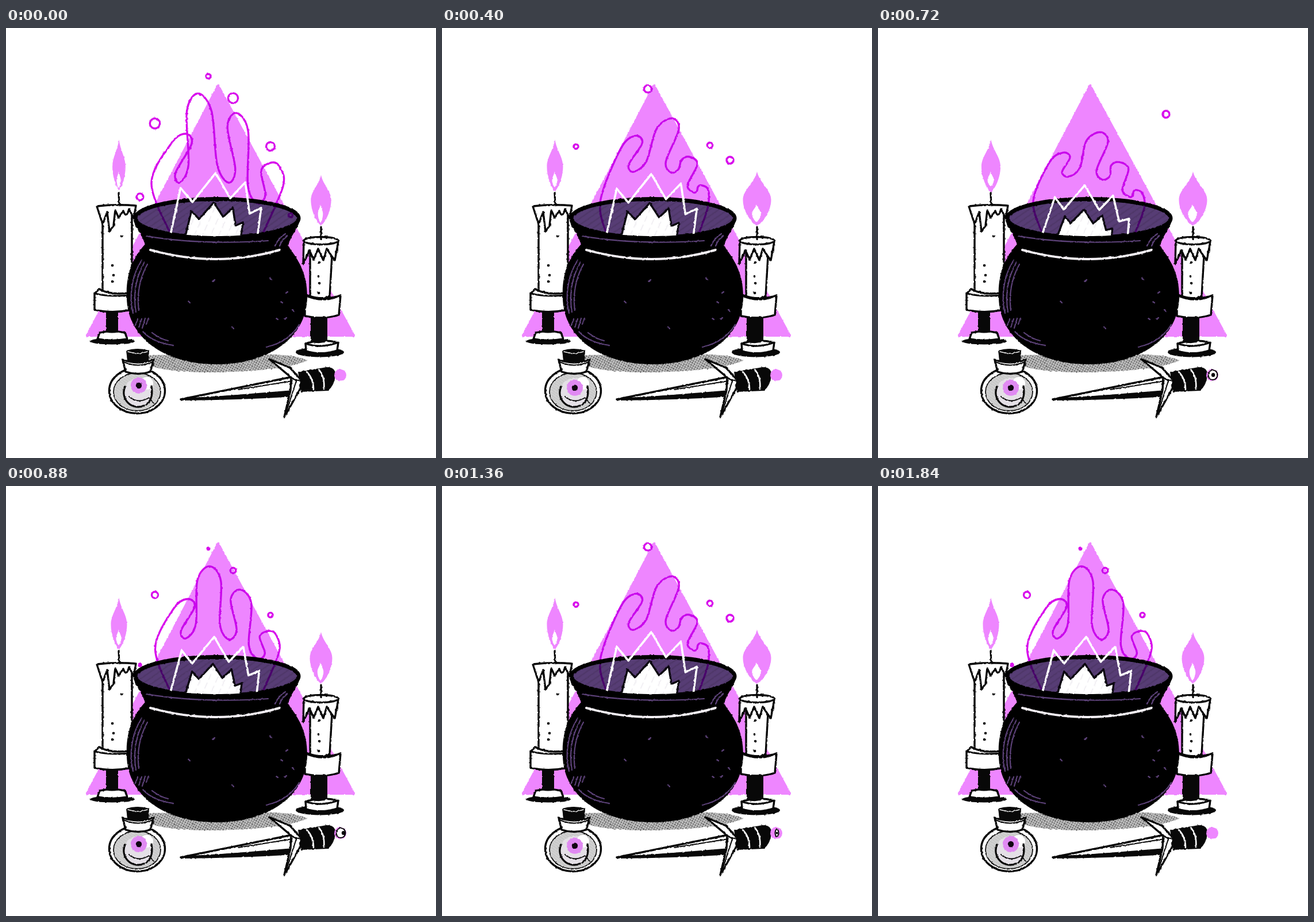
Recreate the animation shown at these times as an HTML page. Size 748 px wide and 748 px high, loop 1920 ms.

```html
<!DOCTYPE html>
<html lang="en">
<head>
<meta charset="utf-8">
<title>Cauldron</title>
<style>
html, body { margin: 0; width: 100%; height: 100%; overflow: hidden; background: #fff; }
svg { display: block; width: 100vw; height: 100vh; }
.ink { fill: #fff; stroke: #060606; stroke-width: 3.4; }
.line { fill: none; stroke: #060606; stroke-width: 3.2; }
.thin { stroke-width: 2; }
.black { fill: #080808; }
.dots { fill: none; stroke: #080808; stroke-width: 4.6; }
.shine { fill: none; stroke: #5d4279; stroke-width: 2.2; }
.magic { fill: none; stroke: #d80cec; stroke-width: 3.4; mix-blend-mode: multiply; }
.pink { fill: #ee86ff; }
</style>
</head>
<body>
<svg viewBox="0 0 748 748" stroke-linecap="round" stroke-linejoin="round">
<defs>
  <filter id="rough" filterUnits="userSpaceOnUse" x="0" y="0" width="748" height="748" color-interpolation-filters="sRGB">
    <feTurbulence type="fractalNoise" baseFrequency=".25" numOctaves="1" seed="4"/>
    <feDisplacementMap in="SourceGraphic" scale="3" xChannelSelector="R" yChannelSelector="G"/>
  </filter>
  <pattern id="stipple" width="4" height="4" patternUnits="userSpaceOnUse" patternTransform="rotate(28)">
    <rect width="4" height="4" fill="#c0c0c0"/><circle cx="2" cy="2" r="1.2" fill="#5c5c5c"/>
  </pattern>
  <pattern id="glass" width="4" height="4" patternUnits="userSpaceOnUse" patternTransform="rotate(35)">
    <rect width="4" height="4" fill="#d2d2d2"/><path d="M0 2H4" stroke="#bcbcbc" stroke-width="1.2"/>
  </pattern>
  <pattern id="hatch" width="9" height="9" patternUnits="userSpaceOnUse" patternTransform="rotate(-35)">
    <rect width="9" height="9" fill="#573d75"/><path d="M0 4H9" stroke="#4f3769" stroke-width="2.5"/>
  </pattern>
  <pattern id="scribble" width="13" height="17" patternUnits="userSpaceOnUse" patternTransform="rotate(24)">
    <rect width="13" height="17" fill="#fff"/><path d="M4 0V11" stroke="#e6e1ea"/>
  </pattern>
  <clipPath id="mouth"><path d="M0 0H748V331H509C509 349 445 362 367 362S225 349 225 331H0Z"/></clipPath>
</defs>
<g filter="url(#rough)">
  <path class="pink" stroke="#ee86ff" stroke-width="4" d="M369 100L141 535H605Z"/>
  <path fill="url(#stipple)" d="M222 569C238 592 290 600 370 599C450 597 500 590 525 578C505 569 470 567 440 568Z"/>

  <!-- left candle -->
  <ellipse class="black" cx="185" cy="545" rx="39" ry="5.5"/>
  <path class="ink" d="M159 541L163 530Q185 525 207 530L211 541Q185 546 159 541Z"/>
  <path class="black" d="M174 488H195V529Q185 532 174 529Z"/>
  <path class="ink" d="M168 312V458Q190 470 219 461V312Z"/>
  <path class="ink" d="M154 462L162 454Q180 465 214 461V491Q182 497 154 490Z"/>
  <path class="line" d="M155 462Q180 468 213 465"/>
  <path class="ink" d="M158 310Q192 306 226 309L222 331L214 315Q209 333 204 318L196 330L190 317L187 344L180 354L176 320L168 341Z"/>
  <path class="line" d="M196 287L197 309"/>
  <path class="dots" d="M201 362h.1M185 413h.1M187 430h.1M185 441h.1"/>

  <!-- right candle -->
  <ellipse class="black" cx="546" cy="564" rx="42" ry="8.5"/>
  <path class="ink" d="M521 549Q548 540 578 547L576 561Q548 570 522 562Z"/>
  <path class="line" d="M521 549Q548 558 578 547"/>
  <path class="black" d="M530 500H559V545Q546 551 530 546Z"/>
  <path class="ink" d="M529 380V467Q546 474 563 467L568 380Z"/>
  <path class="ink" d="M520 463Q548 476 582 465L579 499Q552 508 520 501Z"/>
  <path class="line" d="M521 465Q550 479 581 466"/>
  <path class="ink" d="M518 370L517 410L528 387L535 403L543 384L552 404L558 384L566 396L572 404L578 372Z"/>
  <ellipse class="ink" cx="548" cy="370" rx="30" ry="6.5"/>
  <path class="line" d="M548 346V368"/>
  <path class="dots" d="M545 408h.1M543 432h.1M545 444h.1M544 461h.1"/>

  <path id="leftFlame" class="pink"/><path id="leftCore" fill="#fff"/>
  <path id="rightFlame" class="pink"/><path id="rightCore" fill="#fff"/>

  <!-- cauldron -->
  <path d="M243 375C222 398 208 425 210 470C212 541 278 585 366 585S523 541 524 468C524 425 508 403 490 378Z"/>
  <path d="M221 330C224 349 238 358 243 381Q367 420 491 382C493 361 510 349 512 330Z"/>
  <ellipse cx="367" cy="331" rx="142" ry="33.5" fill="url(#hatch)" stroke="#000" stroke-width="7"/>
  <path id="fire" class="magic"/>
  <g id="bubbles" class="magic"></g>
  <g clip-path="url(#mouth)">
    <path id="crown" fill="url(#scribble)" stroke="#0b0710" stroke-width="3.4"/>
    <path id="zigzag" fill="none" stroke="#fff" stroke-width="3.6"/>
  </g>
  <path fill="none" stroke="#f3eff4" stroke-width="4" d="M251 386Q366 418 476 386"/>
  <path class="shine" d="M244 362Q340 378 456 370M468 379Q474 365 486 358M476 379Q480 368 489 362
    M236 404C216 435 215 472 221 496M241 407C223 439 222 470 226 494M246 411C230 440 228 467 231 491
    M229 507L225 517M236 506L231 521M242 505L237 522M248 505L244 515
    M238 528Q255 547 291 552M254 530Q268 541 282 544M453 555Q492 546 510 516
    M359 441l4-3M317 475l3 3M393 520l3 3M459 435l3 3M478 476l3 2M487 461l3-2M498 490l3 3M485 506l3-2M470 505l3 2"/>

  <!-- bottle -->
  <ellipse class="ink" cx="228" cy="631" rx="48.5" ry="39.5"/>
  <ellipse cx="228" cy="633" rx="41" ry="33" fill="url(#glass)" stroke="#111" stroke-width="1.8"/>
  <circle cx="230" cy="634" r="25" fill="#e4e0e6"/>
  <circle cx="245" cy="618" r="11" fill="#fff"/>
  <path class="line" d="M207 624A25 25 0 0 0 240 657M244 655Q257 646 253 623"/>
  <path class="line thin" d="M214 641Q229 655 249 643L257 653"/>
  <g id="iris"><circle r="14" fill="#e08af2"/><circle r="5.2" fill="#100612"/></g>
  <path class="ink" d="M203 577Q230 587 257 577L251 598Q230 605 208 598Z"/>
  <path class="line thin" d="M205 581Q230 592 255 581"/>
  <path class="black" d="M209 561Q229 555 249 561L248 579Q230 585 211 579Z"/>
  <path fill="none" stroke="#eee" stroke-width="1.4" d="M212 563Q230 569 246 563"/>

  <!-- dagger -->
  <path class="ink" d="M304 646L497 607L502 634Z"/>
  <path class="black" d="M304 646L500 630L505 641Q410 647 304 648Z"/>
  <path class="line thin" d="M404 629L498 614"/>
  <path class="black" d="M508 598L558 590Q573 590 573 603Q572 621 560 631L513 633Z"/>
  <path fill="none" stroke="#fff" stroke-width="2.6" d="M523 598Q535 610 535 629M544 594Q555 607 553 628"/>
  <path class="ink" d="M458 576L494 591L514 613L511 629L484 677L495 630L496 608Z"/>
  <path class="line thin" d="M460 578L505 614L486 673M497 610L512 614"/>
  <circle class="pink" cx="581.5" cy="604" r="10.5"/>
  <g id="pommelEye">
    <ellipse id="lid" cx="582.5" cy="603.5" class="ink thin"/>
    <ellipse id="pupil" cy="603.5" class="black"/>
  </g>
</g>
</svg>
<script>
const $ = id => document.getElementById(id);
const set = (el, attrs) => Object.entries(attrs).forEach(([k, v]) => el.setAttribute(k, v));
const STEP = 80, FRAMES = 24, CYCLE = 12;
const GROW = 7, REST = 5; // steps from the lowest fire to the highest, and to the resting pose

const clamp = v => Math.min(1, Math.max(0, v));
const wave = (p, peak, period = CYCLE) => Math.cos(2 * Math.PI * (p - peak) / period);
const points = text => text.split(' ').map(pair => pair.split(',').map(Number));
const mix = (a, b, k) => a.map((v, i) => v + (b[i] - v) * k);
const mixAll = (a, b, k) => a.map((p, i) => mix(p, b[i], k));
const polyline = list => 'M' + list.join('L');

// Left belly, then tips and troughs in turn, then right belly.
const fireLow = points('276,310 325,228 341,255 404,204 391,262 425,262 438,290 446,298 457,325');
const fireRest = points('253,270 312,184 302,269 334,114 387,269 401,148 437,305 462,234 482,275');
const fireHigh = points('275,285 352,127 322,243 392,87 409,235 437,167 437,280 459,237 471,290');
const zigzagLow = points('286,358 308,296 323,317 359,276 384,319 408,294 419,338 436,334 434,362');
const zigzagHigh = points('287,358 298,255 326,284 372,221 398,266 427,235 430,303 454,285 442,362');

// Gives every tip and trough two rounded shoulders.
function fireOutline(keys) {
  const body = keys.slice(1, -1).flatMap((p, i) => {
    const reach = i % 2 ? 9 : 13;
    const shoulder = (near, sign) => {
      const [x, y] = mix(p, near, .2);
      return [x + sign * Math.min(reach, Math.abs(near[1] - p[1]) * .25), y];
    };
    return [shoulder(keys[i], -1), p, shoulder(keys[i + 2], 1)];
  });
  return [[285, 356], keys[0], ...body, keys[keys.length - 1], [447, 357]];
}

function smooth(p) {
  const at = i => p[Math.min(p.length - 1, Math.max(0, i))];
  const handle = (a, b, c, s) => b.map((v, j) => v + s * (c[j] - a[j]) / 6);
  return 'M' + p[0] + p.slice(1).map((end, i) =>
    'C' + [handle(at(i - 1), at(i), end, 1), handle(at(i), end, at(i + 2), -1), end].join(' ')).join('');
}

function teardrop(x, top, w, mid, bottom) {
  const up = mid - top, down = bottom - mid;
  return [1, -1].map(s => `M${x} ${top}C${x + s * w * .2} ${top + up * .4} ${x + s * w} ${mid - up * .35} ${x + s * w} ${mid}` +
    `C${x + s * w} ${mid + down * .45} ${x + s * w * .4} ${bottom - down * .12} ${x} ${bottom}Z`).join('');
}

const bubbles = [
  { birth: 10.4, life: 4.6, x: 352, y: 124, rise: 25, size: 4.5 },
  { birth: 10, life: 7, x: 395, y: 172, rise: 25, size: 11 },
  { birth: 10, life: 4.8, x: 259, y: 213, rise: 23.5, size: 9 },
  { birth: 10, life: 7, x: 460, y: 243, rise: 18.5, size: 9.5 },
  { birth: 10.5, life: 7.5, x: 233, y: 320, rise: 17.5, size: 10 },
  { birth: 11, life: 4, x: 495, y: 342, rise: 16.5, size: 5 },
  { birth: 3.5, life: 5.5, x: 358, y: 142, rise: 24, size: 8.5 },
  { birth: 4, life: 5, x: 466, y: 225, rise: 21, size: 8 },
  { birth: 4, life: 6, x: 501, y: 250, rise: 20, size: 12 }
].map(b => ({ ...b, ring: $('bubbles').appendChild(document.createElementNS('http://www.w3.org/2000/svg', 'circle')) }));

function drawFire(p) {
  const s = (p + GROW - 2 - REST + REST) % CYCLE;
  const fall = (s - GROW) / (CYCLE - GROW);
  const keys = s < REST ? mixAll(fireLow, fireRest, (s / REST) ** 1.5)
    : s < GROW ? mixAll(fireRest, fireHigh, (s - REST) / (GROW - REST))
    : mixAll(fireHigh, fireLow, fall);
  $('fire').setAttribute('d', smooth(fireOutline(keys)));

  const zigzag = mixAll(zigzagLow, zigzagHigh, s < GROW ? (s / GROW) ** 2.5 : 1 - fall);
  const crown = zigzag.map(([x, y]) => [365 + (x - 370) * .64, 366 + (y - 362) * .57]);
  $('zigzag').setAttribute('d', polyline(zigzag));
  $('crown').setAttribute('d', polyline(crown) + 'Z');
}

function drawBubbles(p) {
  for (const { birth, life, x, y, rise, size, ring } of bubbles) {
    const age = (p - birth + CYCLE) % CYCLE;
    set(ring, {
      cx: x, cy: y - rise * age, r: Math.max(0, size * Math.sin(Math.PI * age / life)),
      visibility: age > 0 && age < life ? 'visible' : 'hidden'
    });
  }
}

function drawCandles(p) {
  const left = wave(p, 3.5, 6), right = wave(p, 7);
  $('leftFlame').setAttribute('d', teardrop(196.5, 194, 14 + 3 * left, 241, 284 + 2 * left));
  $('leftCore').setAttribute('d', teardrop(196, 249, 4.5 + left, 265, 277 - 2 * left));
  $('rightFlame').setAttribute('d', teardrop(548, 252 - 4 * right, 22 + 5 * right, 299, 344));
  $('rightCore').setAttribute('d', teardrop(547, 307, 6.5 + 2.5 * right, 323, 338 - right));
}

function drawEyes(p, frame) {
  set($('iris'), { transform: `translate(231 ${624.4 - 2.8 * wave(p, 1)})` });

  const open = clamp(Math.min((frame - 6.8) / 2.2, (20 - frame) / 8));
  const rx = 8 * open, tall = Math.sqrt(open);
  const glance = 4.5 * Math.exp(-((frame - 11) ** 2) / 2);
  set($('pommelEye'), { visibility: open > 0 ? 'visible' : 'hidden' });
  set($('lid'), { rx, ry: 2.5 + 6 * tall });
  set($('pupil'), { cx: 582.5 + glance, rx: Math.min(3.2, rx * .6), ry: 3.6 * tall });
}

function draw(frame) {
  const p = frame % CYCLE;
  drawFire(p);
  drawBubbles(p);
  drawCandles(p);
  drawEyes(p, frame);
}

const start = performance.now();
let shown = -1;
function tick() {
  const frame = Math.floor((performance.now() - start) / STEP) % FRAMES;
  if (frame !== shown) draw(shown = frame);
  requestAnimationFrame(tick);
}
tick();
</script>
</body>
</html>
```
